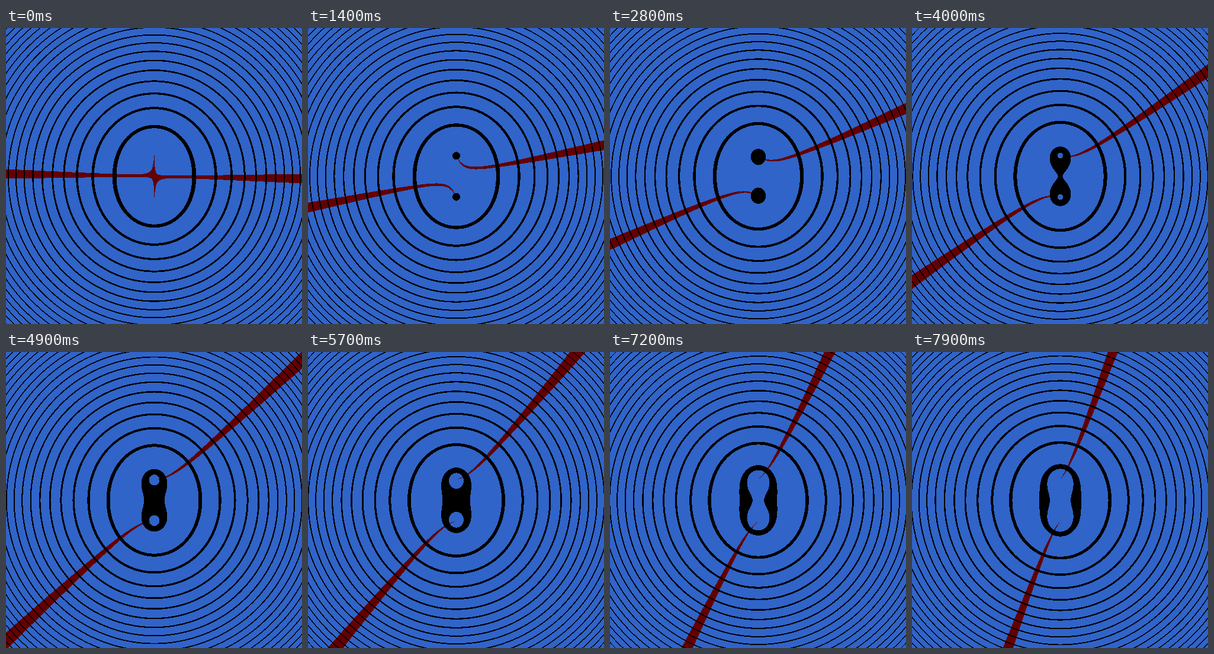
Write an HTML page with a canvas that moves like this. It is 500x500 px and loops after 8 s.

```html
<!DOCTYPE html>
<html lang="en">
<head>
<meta charset="utf-8">
<title>Level curves of a complex square</title>
<style>
  html, body { margin: 0; width: 100%; height: 100%; overflow: hidden; background: #3064c8; }
  canvas { display: block; width: 100vw; height: 100vh; image-rendering: pixelated; }
</style>
</head>
<body>
<canvas id="view" width="500" height="500"></canvas>
<script>
  const SIZE = 500, HALF = SIZE / 2;
  const LOOP = 8000, STEP = 100, TURN = 20000;
  const SCALE = HALF / 10;  // the plane runs from -10 to 10
  const SHIFT = 2;          // w = z * z + SHIFT
  const SPACING = 10;       // distance between rings in |w|

  // Band limits around the moving phase, as fractions of one cycle.
  const RING = { back: 0.145, width: 0.1475 };
  const RAY = { back: 0.015, width: 0.02 };

  const ctx = document.getElementById("view").getContext("2d");
  const image = ctx.createImageData(SIZE, SIZE);
  const pixels = new Uint32Array(image.data.buffer);
  const modulus = new Float64Array(SIZE * SIZE);
  const argument = new Float64Array(SIZE * SIZE);

  const rgb = (r, g, b) => (0xff000000 | b << 16 | g << 8 | r) >>> 0;
  const BLUE = rgb(48, 100, 200), RED = rgb(100, 0, 0), BLACK = rgb(0, 0, 0);

  // Both fields are stored in cycles.
  for (let i = 0; i < pixels.length; i++) {
    const x = (i % SIZE - HALF) / SCALE;
    const y = (HALF - Math.floor(i / SIZE)) / SCALE;
    const re = x * x - y * y + SHIFT, im = 2 * x * y;
    modulus[i] = Math.hypot(re, im) / SPACING;
    argument[i] = Math.atan2(im, re) / (2 * Math.PI);
  }

  const inBand = (value, phase, band) =>
    (value - phase + band.back + 2) % 1 < band.width;

  function draw(time) {
    const phase = time / TURN;
    for (let i = 0; i < pixels.length; i++) {
      pixels[i] = inBand(modulus[i], phase, RING) ? BLACK
        : inBand(argument[i], phase, RAY) ? RED : BLUE;
    }
    ctx.putImageData(image, 0, 0);
  }

  const start = performance.now();
  let shown = -1;
  function tick() {
    const time = (performance.now() - start) % LOOP;
    const step = Math.floor(time / STEP);
    if (step !== shown) draw(step * STEP);
    shown = step;
    requestAnimationFrame(tick);
  }
  tick();
</script>
</body>
</html>
```
